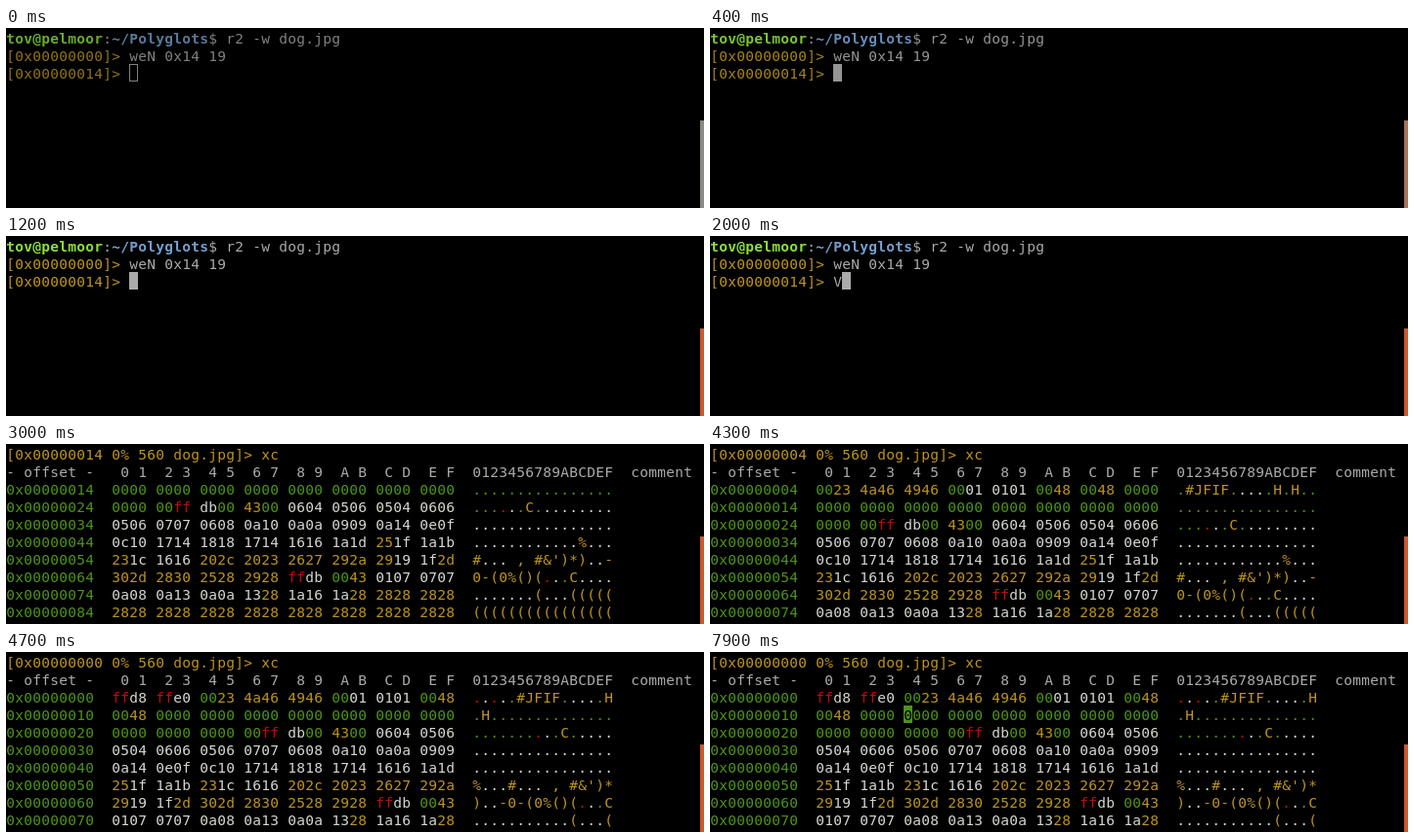
Recreate the animation shown at these times as an HTML page with a canvas. Size 714 by 185 pixels, loop 8000 ms.

```html
<!DOCTYPE html>
<html lang="en">
<head>
<meta charset="utf-8">
<title>Hex editor session</title>
<style>
html, body { margin: 0; width: 100%; height: 100%; overflow: hidden; background: #000; }
canvas { display: block; }
</style>
</head>
<body>
<canvas id="screen" width="714" height="185"></canvas>
<script>
const ctx = document.getElementById('screen').getContext('2d');
const LOOP = 8000, CELL_W = 9, CELL_H = 18, TOP = 1, BASE = 15;
const FONT = '14.5px "DejaVu Sans Mono", monospace';
const GREY = '#aaaaaa', WHITE = '#d3d7cf', YELLOW = '#bc941f', GREEN = '#4e921a',
      RED = '#c00c0c', LIME = '#8ae234', BLUE = '#729fcf', ORANGE = '#c85a32';

// File header as shown by the hex view; everything after it is 0x28.
const DUMP = `
ffd8 ffe0 0023 4a46 4946 0001 0101 0048
0048 0000 0000 0000 0000 0000 0000 0000
0000 0000 0000 00ff db00 4300 0604 0506
0504 0606 0506 0707 0608 0a10 0a0a 0909
0a14 0e0f 0c10 1714 1818 1714 1616 1a1d
251f 1a1b 231c 1616 202c 2023 2627 292a
2919 1f2d 302d 2830 2528 2928 ffdb 0043
0107 0707 0a08 0a13 0a0a 1328 1a16 1a28`.replace(/\s/g, '');

const byteAt = i => DUMP.substr(i * 2, 2) || '28';
const address = n => '0x' + n.toString(16).padStart(8, '0');
const printable = v => v >= 0x20 && v < 0x7f;

function byteColor(v) {
  if (v === 0) return GREEN;
  if (v === 255) return RED;
  return printable(v) ? YELLOW : WHITE;
}

// Each character is centred in its own terminal cell.
function write(col, row, text, color, bold) {
  ctx.font = (bold ? 'bold ' : '') + FONT;
  ctx.textAlign = 'center';
  ctx.fillStyle = color;
  for (const ch of text) {
    if (ch !== ' ') ctx.fillText(ch, (col + 0.5) * CELL_W, TOP + row * CELL_H + BASE);
    col++;
  }
  return col;
}

function block(col, row, color) {
  ctx.fillStyle = color;
  ctx.fillRect(col * CELL_W, TOP + row * CELL_H, CELL_W, CELL_H);
}

function scrollbar(color) {
  ctx.fillStyle = color;
  ctx.fillRect(710, 95, 4, 90);
}

function shell(t) {
  const focus = t < 400 ? 0 : t < 500 ? 0.5 : 1;
  ctx.globalAlpha = 0.76 + 0.24 * focus;
  let col = write(0, 0, 'tov@pelmoor', LIME, true);
  col = write(col, 0, ':', GREY);
  col = write(col, 0, '~/Polyglots', BLUE, true);
  write(col, 0, '$ r2 -w dog.jpg', GREY);
  col = write(0, 1, '[0x00000000]> ', YELLOW);
  write(col, 1, 'weN 0x14 19', GREY);
  col = write(0, 2, '[0x00000014]> ', YELLOW);
  if (t >= 2000) col = write(col, 2, 'V', GREY);

  const blinkOff = (t >= 1000 && t < 1200) || (t >= 2200 && t < 2700);
  if (!focus) {
    ctx.strokeStyle = GREY;
    ctx.lineWidth = 1;
    ctx.strokeRect(col * CELL_W + 0.5, TOP + 2 * CELL_H + 0.5, CELL_W - 1, CELL_H - 1);
  } else if (!blinkOff) {
    block(col, 2, GREY);
  }
  ctx.globalAlpha = 1;
  scrollbar('#888a85');
  ctx.globalAlpha = focus;
  scrollbar(ORANGE);
  ctx.globalAlpha = 1;
}

function hexView(start, cursor) {
  write(0, 0, `[${address(start)} 0% 560 dog.jpg]> xc`, YELLOW);
  write(0, 1, '- offset -   0 1  2 3  4 5  6 7  8 9  A B  C D  E F  0123456789ABCDEF  comment', GREY);
  for (let line = 0; line < 8; line++) {
    const row = line + 2, offset = start + line * 16;
    write(0, row, address(offset), GREEN);
    for (let i = 0; i < 16; i++) {
      const hex = byteAt(offset + i), v = parseInt(hex, 16), color = byteColor(v);
      write(12 + i * 2 + (i >> 1), row, hex, color);
      write(53 + i, row, printable(v) ? String.fromCharCode(v) : '.', color);
    }
  }
  if (cursor) {
    block(22, 3, GREEN);
    write(22, 3, '0', '#000');
  }
  scrollbar(ORANGE);
}

function draw(t) {
  ctx.fillStyle = '#000';
  ctx.fillRect(0, 0, 714, 185);
  if (t < 3000) shell(t);
  else hexView(t < 4300 ? 0x14 : t < 4700 ? 4 : 0, t >= 7900);
}

const began = performance.now();
function tick() {
  draw((performance.now() - began) % LOOP);
  requestAnimationFrame(tick);
}
tick();
</script>
</body>
</html>
```
